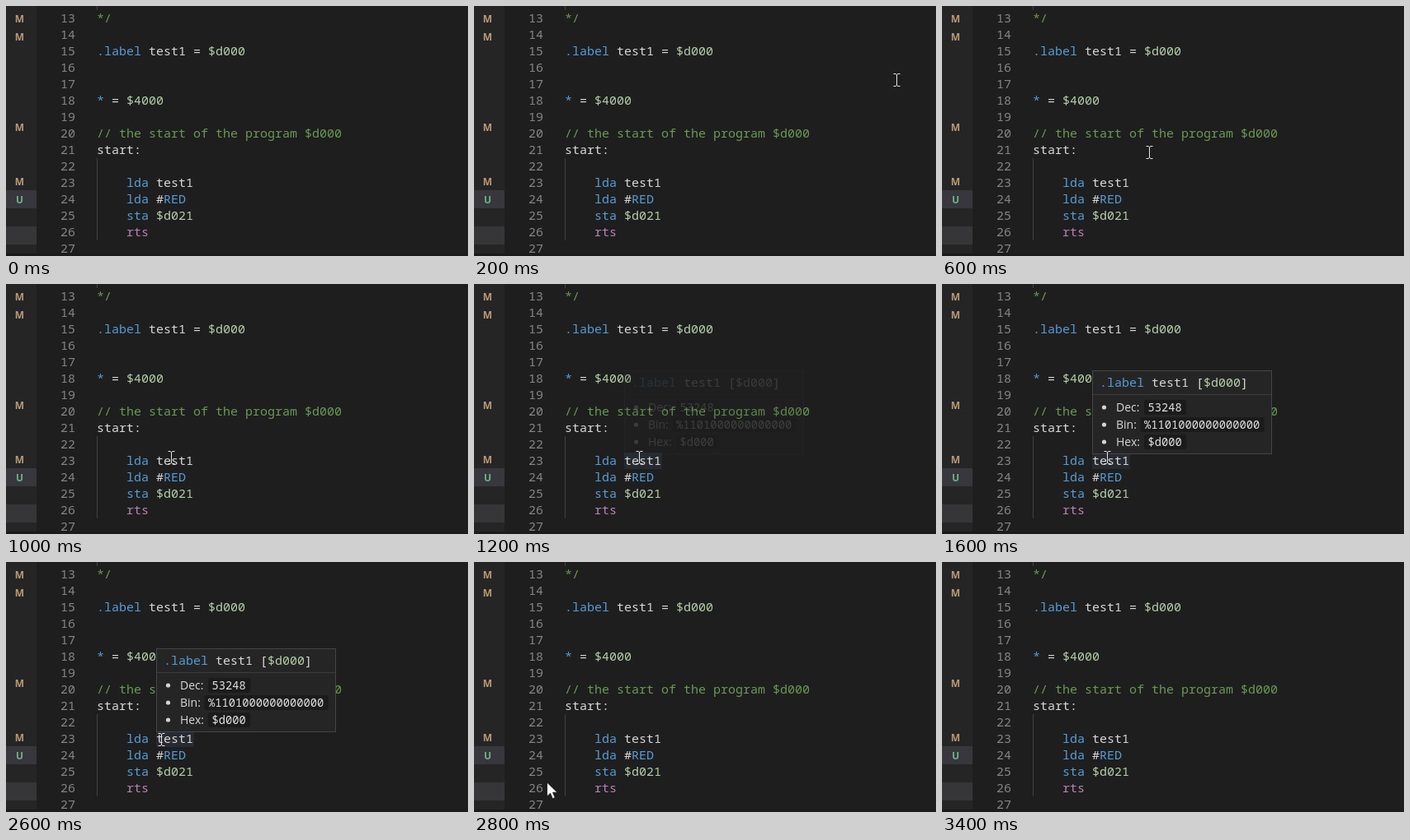
An HTML page that plays this animation: 560 px wide and 304 px high, repeating every 3800 ms.

```html
<!DOCTYPE html>
<html lang="en">
<head>
<meta charset="utf-8">
<title>Hover in a code editor</title>
<style>
  html, body { margin: 0; width: 100%; height: 100%; overflow: hidden; background: #1e1e1e; }
  svg { display: block; }
  text { white-space: pre; fill: #d8d8d8; }
  .mono { font: 500 15px "Noto Sans Mono", monospace; }
  .value { font: 500 13.75px "Noto Sans Mono", monospace; fill: #e0e0e0; }
  .label { font: 500 14px "Open Sans", sans-serif; }
  .mark { font: 700 12px "Open Sans", sans-serif; text-anchor: middle; }
  .no { fill: #858585; text-anchor: end; font-weight: 400; }
  .key { fill: #569cd6; }
  .num { fill: #b5cea8; }
  .rem { fill: #6a9955; }
  .ret { fill: #bd80b4; }
</style>
</head>
<body>
<svg width="560" height="304" viewBox="0 0 560 304">
  <rect width="560" height="304" fill="#1e1e1e"/>
  <rect width="37" height="304" fill="#252526"/>
  <rect y="224" width="37" height="22" fill="#37373d"/>
  <rect y="268" width="37" height="22" fill="#363638"/>
  <g id="marks"></g>
  <path d="M110.5 0V5M110.5 185V285" stroke="#404040"/>
  <rect id="word" x="182" y="205" width="46" height="20" fill="#272a31"/>
  <g id="code" class="mono"></g>
  <rect y="301" width="560" height="3" fill="#1b1b1b"/>
  <g id="popup">
    <rect x="182.5" y="105.5" width="217" height="101" fill="#252526" stroke="#454545"/>
    <path d="M183 134.5H399" stroke="#3c3c3d"/>
    <text class="mono" x="191" y="125"><tspan class="key">.label</tspan> test1 [<tspan class="num">$d000</tspan>]</text>
    <g id="list"></g>
  </g>
  <path id="beam" d="M-4 -7.5H-1.5L0 -6.5L1.5 -7.5H4M0 -6.5V6.5M-4 7.5H-1.5L0 6.5L1.5 7.5H4" fill="none" stroke="#e4e4e4"/>
  <path id="arrow" d="M0 0V17L4 13.2L6.8 19.8L9.8 18.5L7 12.2H12.4Z" fill="#fff" stroke="#111" stroke-width=".8"/>
</svg>
<script>
const $ = id => document.getElementById(id);
const span = (cls, s) => `<tspan class="${cls}">${s}</tspan>`;
const text = (cls, x, y, s) => `<text class="${cls}" x="${x}" y="${y}">${s}</text>`;

const lines = [
  span("rem", "*/"), "",
  span("key", ".label") + " test1 = " + span("num", "$d000"), "", "",
  span("key", "*") + " = " + span("num", "$4000"), "",
  span("rem", "// the start of the program $d000"),
  "start:", "",
  "    " + span("key", "lda") + " test1",
  "    " + span("key", "lda") + " #" + span("key", "RED"),
  "    " + span("key", "sta") + " " + span("num", "$d021"),
  "    " + span("ret", "rts"), ""
];
$("code").innerHTML = lines.map((s, i) =>
  text("no", 84, 20 + 20 * i, 13 + i) + text("", 110, 20 + 20 * i, s)).join("");

$("marks").innerHTML = [15, 37, 147, 213, 235].map(y => {
  const fresh = y === 235;
  return `<text class="mark" x="16.5" y="${y + 4.5}" style="fill:${fresh ? "#6cb285" : "#b89a74"}">${fresh ? "U" : "M"}</text>`;
}).join("");

const values = [["Dec:", "53248", 249.5], ["Bin:", "%1101000000000000", 245], ["Hex:", "$d000", 249.5]];
$("list").innerHTML = values.map(([name, value, x], i) => {
  const y = 155 + 21 * i;
  return `<circle cx="196.5" cy="${y - 5}" r="2.6" fill="#d4d4d4"/>` +
    `<rect x="${x - 4.5}" y="${y - 14}" width="${value.length * 8.25 + 10}" height="18" rx="3" fill="#1b1b1c"/>` +
    text("label", 211, y, name) + text("value", x, y, value);
}).join("");

// Text cursor: start time, x, y
const stops = [[200, 512.5, 90], [400, 343.5, 141], [600, 251.5, 178], [800, 200.5, 211], [2600, 188.5, 216]];

function place(el, at) {
  el.style.display = at ? "" : "none";
  if (at) el.setAttribute("transform", `translate(${at[0]} ${at[1]})`);
}

function draw(now) {
  const t = now % 3800;
  const stop = t < 2800 && stops.filter(s => s[0] <= t).pop();
  place($("beam"), stop && stop.slice(1));
  place($("arrow"), t >= 2800 && t < 3000 && [88.5, 268]);
  const hover = t >= 1200 && t < 2800;
  $("word").style.display = hover ? "" : "none";
  $("popup").style.opacity = !hover ? 0 : t < 1400 ? 0.16 : 1;
  requestAnimationFrame(draw);
}
draw(performance.now());
</script>
</body>
</html>
```
